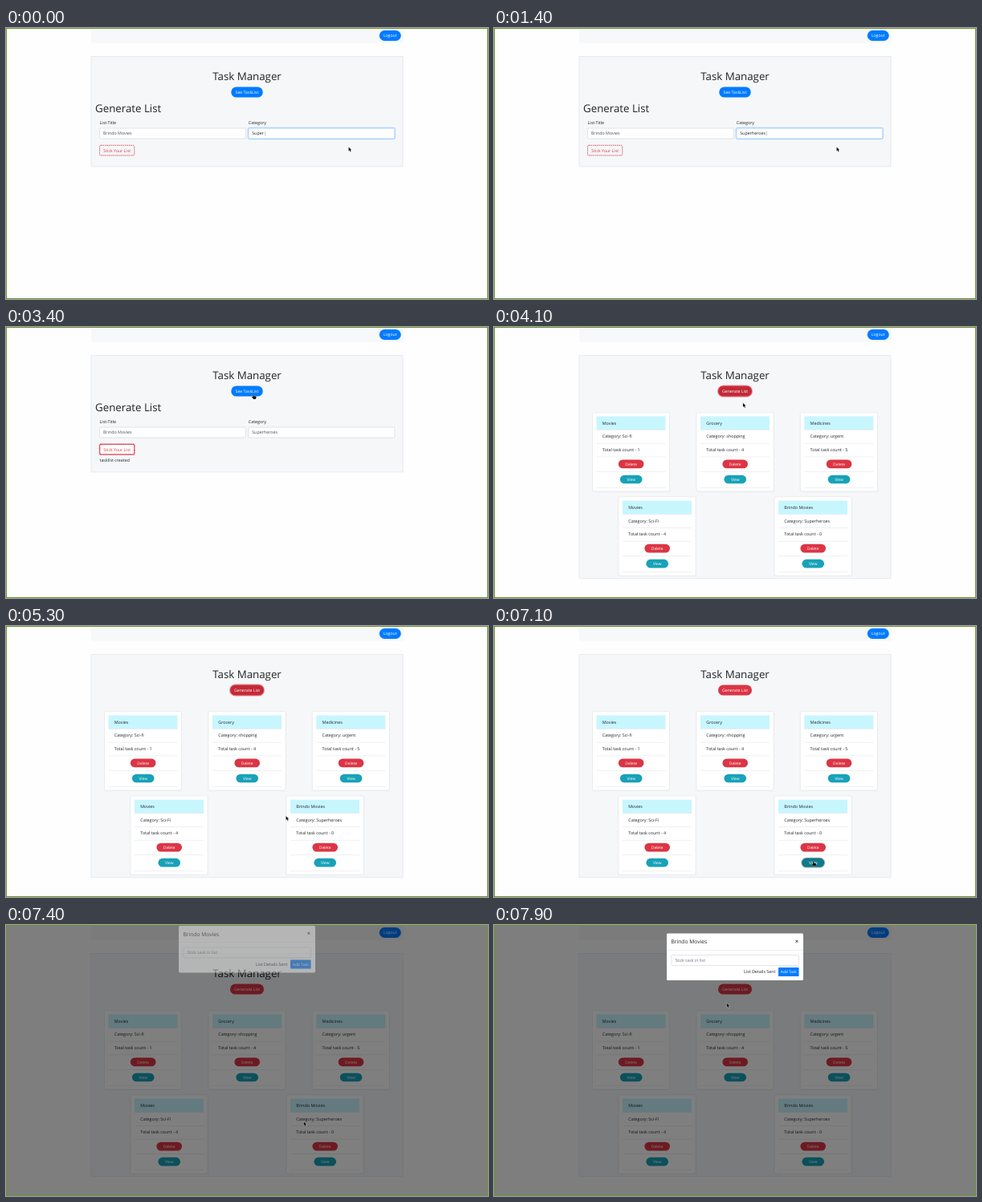
An HTML page that plays this animation: 600x338 px, repeating every 8000 ms.

```html
<!DOCTYPE html>
<html lang="en">
<head>
<meta charset="utf-8">
<title>Task Manager</title>
<style>
  html, body { margin: 0; width: 100%; height: 100%; overflow: hidden; background: #fefefe; }
  svg { display: block; width: 600px; height: 338px; }
  text { font-family: "Open Sans", "Noto Sans", sans-serif; text-rendering: geometricPrecision; }
</style>
</head>
<body>
<svg id="stage" viewBox="0 0 600 338"></svg>
<script>
const LOOP = 8000, STEP = 100;
const BLUE = '#007bff', RED = '#dc3545', DARK_RED = '#c12a38', TEAL = '#17a2b8', INK = '#212529';
const LIST_NAME = 'Brindo Movies';
const stage = document.getElementById('stage');

// time, x, y of the pointer tip
const POINTER = [
  [0, 426.5, 148.5], [2600, 426.5, 148.5], [2800, 352, 116], [3000, 352, 116],
  [3400, 307.5, 84], [3900, 307.5, 84], [4400, 313.5, 111], [4700, 319, 158],
  [5000, 319, 158], [5300, 348.5, 237], [5500, 348.5, 237], [6000, 397, 293.5],
  [7300, 397, 293.5], [7700, 291.5, 100], [7800, 291.5, 100], [7900, 289.7, 97.5]
];
// time at which each further letter of the category is present
const KEYS = [100, 500, 700, 900, 1100, 1200];

const CARDS = [
  [122.5, 106.7, 'Movies', 'Sci-fi', 1],
  [252, 106.7, 'Grocery', 'shopping', 4],
  [381.3, 106.7, 'Medicines', 'urgent', 5],
  [155, 211.9, 'Movies', 'Sci-Fi', 4],
  [349, 211.9, LIST_NAME, 'Superheroes', 0]
];

const clamp = v => Math.max(0, Math.min(1, v));
const rect = (x, y, w, h, fill, attrs = '') =>
  `<rect x="${x}" y="${y}" width="${w}" height="${h}" fill="${fill}" ${attrs}/>`;
const text = (x, y, str, size = 5.35, fill = INK, attrs = '') =>
  `<text x="${x}" y="${y}" font-size="${size}" fill="${fill}" ${attrs}>${str}</text>`;
const centered = (x, y, str, size, fill, attrs = '') =>
  text(x, y, str, size, fill, `text-anchor="middle" ${attrs}`);
const heading = 'font-weight="500"';

function pill(cx, cy, w, h, label, fill, ring, size = 5.2) {
  const halo = ring ? `stroke="${ring}" stroke-opacity=".55" stroke-width="2"` : '';
  return rect(cx - w / 2, cy - h / 2, w, h, fill, `rx="${h / 2}" ${halo}`) +
    centered(cx, cy + 1.9, label, size, '#fff');
}

function input(x, y, w, value, focused, color = '#495057') {
  const halo = focused ? rect(x - .6, y - .6, w + 1.2, 14.2, 'none', 'rx="2" stroke="#bfdeff" stroke-width="1.3"') : '';
  return halo + rect(x, y, w, 13, '#fff', `rx="1.4" stroke="${focused ? '#80bdff' : '#ced4da'}" stroke-width=".6"`) +
    text(x + 4.4, y + 8.4, value, 5.35, color);
}

function page(panelBottom) {
  return rect(0, 0, 600, 338, '#fefefe') +
    rect(106, 0, 388.5, 18.5, '#f7f8fa') +
    pill(478.2, 9.5, 27, 13, 'Logout', BLUE) +
    rect(106, 35.5, 388, panelBottom - 35.5, '#f5f7f9', 'stroke="#e4e8ec" stroke-width=".8"') +
    centered(300, 65, 'Task Manager', 13.3, INK, heading);
}

function formPage(t) {
  const typed = 'Superheroes'.slice(0, 5 + KEYS.filter(k => t >= k).length);
  const typing = t < 1600, created = t >= 2000, pressed = t >= 3600;
  const caret = typing ? '<tspan dx=".2" font-weight="300">|</tspan>' : '';
  const stick = typing
    ? 'stroke-width=".8" stroke-dasharray="1.7 .8"'
    : 'stroke-width="1.5" stroke-dasharray="1.7 .4"';
  return page(created ? 181 : 173) +
    pill(300, 80, 39.5, 13.2, 'See TaskList', pressed ? '#0062cc' : BLUE, pressed && BLUE) +
    text(111, 105, 'Generate List', 13.3, INK, heading) +
    text(116.5, 119.8, 'List-Title') + text(301.8, 119.8, 'Category') +
    input(116.5, 125, 182, LIST_NAME) +
    input(301.8, 125, 182, typed + caret, typing, typing ? INK : undefined) +
    rect(116.6, 146.3, 43.2, 12.6, typing ? 'none' : '#fff', `rx="1.4" stroke="${RED}" ${stick}`) +
    centered(138.2, 154.5, 'Stick Your List', 5.25, RED) +
    (created ? text(116.5, 168, 'tasklist created') : '');
}

function card([x, y, title, category, count], hovered, focused) {
  const line = dy => rect(x + 5, y + dy, 86, .5, '#dfe1e4');
  return rect(x - .6, y + .2, 97.2, 99, '#000', 'rx="1.8" opacity=".035"') +
    rect(x, y, 96, 98.3, '#fff', 'rx="1.4" stroke="#e1e4e7" stroke-width=".6"') +
    rect(x + 5, y + 4.7, 86, 16.8, '#c8f6ff') +
    [21.5, 38.2, 55, 73.6, 93.2].map(line).join('') +
    text(x + 12.3, y + 15, title) +
    text(x + 12.3, y + 31.6, 'Category: ' + category) +
    text(x + 12.3, y + 48.4, 'Total task count - ' + count) +
    pill(x + 48.2, y + 64.2, 31.6, 10.7, 'Delete', RED, null, 4.9) +
    pill(x + 48.2, y + 83.3, 27.6, 10.7, 'View', hovered ? '#117a8b' : TEAL, focused && '#0f6674', 4.9);
}

function listPage(t) {
  const generateFocused = t < 6400;
  const viewHovered = t >= 5900 && t < 7400, viewFocused = t >= 6400 && t < 7400;
  return page(313.7) +
    pill(300, 80, 42, 13.2, 'Generate List', generateFocused ? DARK_RED : RED, generateFocused && RED) +
    CARDS.map((c, i) => card(c, i === 4 && viewHovered, i === 4 && viewFocused)).join('');
}

function modal(t) {
  const p = clamp((t - 7300) / 400), eased = 1 - (1 - p) ** 2;
  return `<g opacity="${eased}" transform="translate(0 ${-17 * (1 - eased)})">` +
    rect(215, 10.5, 170, 58.5, '#fff', 'rx="1.6"') +
    text(220.5, 23.2, LIST_NAME, 6.7, INK, heading) +
    centered(377, 22.6, '×', 7.5, '#444', 'font-weight="700"') +
    rect(215, 31, 170, .5, '#dee2e6') +
    input(221, 37.5, 158.4, 'Stick task in list', false, '#6c757d') +
    text(311, 60.4, 'List Details Sent') +
    rect(354, 53, 25.5, 11, BLUE, 'rx=".6"') +
    centered(366.8, 60.4, 'Add Task', 4.8, '#fff') + '</g>';
}

function pointer(t) {
  const i = POINTER.findIndex(p => p[0] > t);
  const b = POINTER.at(i), a = i > 0 ? POINTER[i - 1] : b;
  const k = b === a ? 0 : clamp((t - a[0]) / (b[0] - a[0]));
  const x = a[1] + (b[1] - a[1]) * k, y = a[2] + (b[2] - a[2]) * k;
  const hand = t >= 3400 && t < 4000 || t >= 5900 && t < 7400;
  const shape = hand
    ? 'M0 0h1v2l3 .7v1.8l-1 1.5h-2.5l-2-2.7.6-.5.9.7z'
    : 'M0 0v5l1.2-1 .9 2 .9-.4-.9-1.9h1.6z';
  return `<path d="${shape}" transform="translate(${x} ${y})" fill="#111" stroke="#fff" stroke-width=".5" paint-order="stroke"/>`;
}

function scene(t) {
  const shade = t < 7200 ? 0 : t < 7400 ? .38 : .5;
  return (t < 3800 ? formPage(t) : listPage(t)) +
    rect(0, 0, 600, 338, '#000', `opacity="${shade}"`) +
    (t >= 7400 ? modal(t) : '') + pointer(t) +
    rect(.5, .5, 599, 337, 'none', 'stroke="#6b962b"');
}

let shown = -1;
function tick() {
  const t = Math.floor(performance.now() % LOOP / STEP) * STEP;
  if (t !== shown) stage.innerHTML = scene(shown = t);
  requestAnimationFrame(tick);
}
tick();
</script>
</body>
</html>
```
